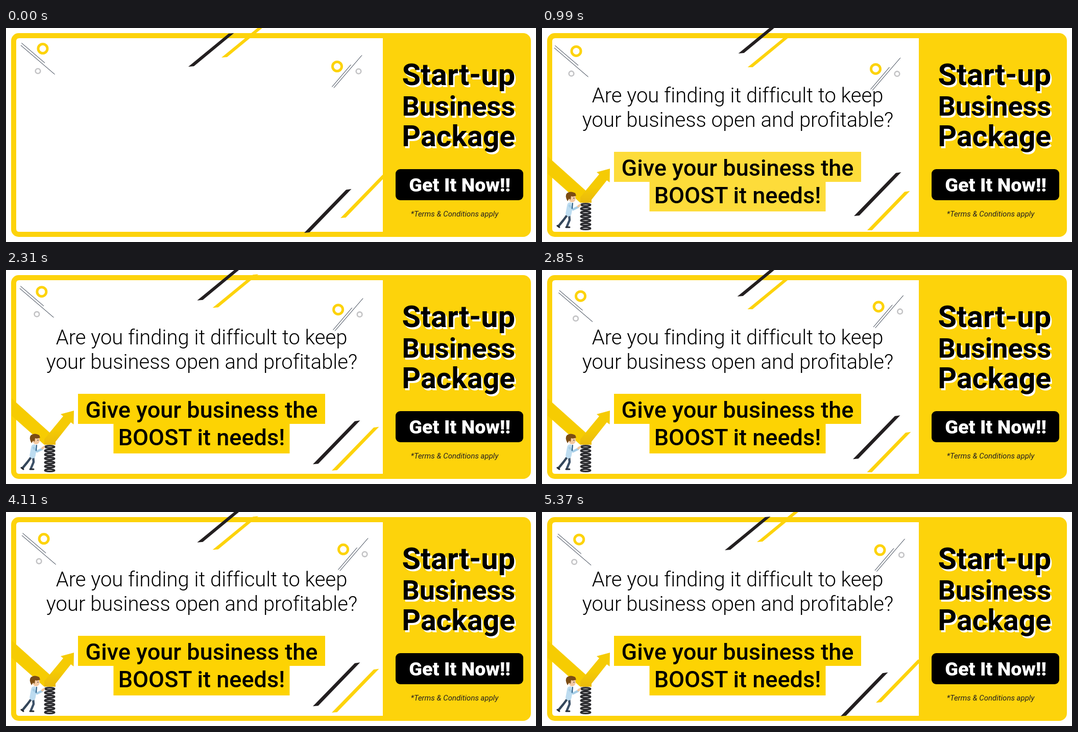
Write an HTML page that moves like this. It is 1038 px wide and 420 px high and loops after 5.4 s.

```html
<!DOCTYPE html>
<html lang="en">
<head>
<meta charset="utf-8">
<title>Start-up Business Package</title>
<style>
  html, body { margin: 0; width: 100%; height: 100%; overflow: hidden; background: #fff; }
  svg { display: block; width: 100%; height: 100%; }
  text { font-family: Roboto, sans-serif; text-anchor: middle; font-variant-ligatures: none; }
  .head { font-weight: 700; }
  .lead { font-weight: 300; font-size: 40px; }
  .boost { font-weight: 500; font-size: 45px; }
  .cta { font-weight: 900; font-size: 37.8px; fill: #fff; }
  .terms { font-style: italic; font-size: 15px; fill: #231f20; }
  .ring { fill: none; stroke: #fdd30b; stroke-width: 5; }
  .dot { fill: none; stroke: #c3c3c5; stroke-width: 2.6; }
  .thin { fill: none; stroke: #1c2738; stroke-width: 1; }
</style>
</head>
<body>
<svg viewBox="0 0 1038 420">
  <defs>
    <path id="barTop" d="M0 0L79 -65L89.500 -66L11 -1Z"/>
    <path id="barLow" d="M0 0L82 -84.500L92.500 -86L10.500 -1Z"/>
    <clipPath id="cutTop"><rect x="0" y="-20" width="1038" height="97"/></clipPath>
    <clipPath id="cutLow"><rect x="0" y="200" width="738" height="197"/></clipPath>
    <linearGradient id="rise" x1="0" y1="1" x2="0" y2="0">
      <stop offset="0" stop-color="#e9b90c"/>
      <stop offset=".45" stop-color="#f5cb04"/>
    </linearGradient>
  </defs>

  <rect x="10" y="10" width="1018" height="400" rx="15" fill="#fdd30b"/>
  <path d="M738 20V400H26Q20 400 20 394V26Q20 20 26 20Z" fill="#fff"/>

  <g id="art">
    <path d="M11 252L85.500 319L97 343H75L11 286Z" fill="#f6cc02"/>
    <path d="M85.500 319L112 287L107 283L133 276L132.500 303L127 299L97 337V343H75V332Z" fill="url(#rise)"/>
    <g id="spring" fill="none" stroke="#2c2c30"></g>
    <g fill="none" stroke-linejoin="round" stroke-linecap="round">
      <path d="M51 365L42 377L33 388" stroke="#34465a" stroke-width="4.500"/>
      <path d="M53 365L54 377L49 389" stroke="#3d5168" stroke-width="4.500"/>
      <path d="M30 388L34 391M47 391L54 391" stroke="#222831" stroke-width="3"/>
      <path d="M55 348L52 364" stroke="#bddcf0" stroke-width="11.500"/>
      <path d="M54 349L61 356L71 351" stroke="#a5cde6" stroke-width="4.500"/>
      <path d="M71 350L74.500 347.500" stroke="#f0c49c" stroke-width="4"/>
      <path d="M60 344L59 354" stroke="#2b5a80" stroke-width="2"/>
    </g>
    <ellipse cx="59" cy="334" rx="7" ry="8" fill="#f3c9a2"/>
    <path d="M50 340Q44 329 49 324Q56 319 65 324L67 329Q61 332 57 330L56 337L53 335Z" fill="#7b4c14"/>
    <circle cx="62.500" cy="334" r=".9" fill="#333"/>
  </g>

  <g id="lead" class="lead">
    <text x="383" y="146">Are you finding it difficult to keep</text>
    <text x="383.500" y="194">your business open and profitable?</text>
  </g>

  <path id="boostBox" d="M141 243H625V302H555.500V360H210.500V302H141Z" fill="#fdd303"/>
  <g id="boostText" class="boost">
    <text x="383" y="290">Give your business the</text>
    <text x="383" y="344">BOOST it needs!</text>
  </g>

  <g id="left">
    <path class="thin" d="M30.500 29.500L76 68.500M29 34L95.500 91"/>
    <circle class="ring" cx="72" cy="40.500" r="9"/>
    <circle class="dot" cx="62.500" cy="84.500" r="4.800"/>
  </g>
  <g id="right">
    <path class="thin" d="M697 53.500L642 117.500M675.500 72L638.500 115.500"/>
    <circle class="ring" cx="648.500" cy="75.500" r="9"/>
    <circle class="dot" cx="690.500" cy="85" r="4.800"/>
  </g>

  <use id="topDark" href="#barTop" fill="#231f20"/>
  <g clip-path="url(#cutTop)"><use id="topGold" href="#barTop" fill="#fdd30b"/></g>
  <use id="lowDark" href="#barLow" fill="#231f20"/>
  <g clip-path="url(#cutLow)"><use id="lowGold" href="#barLow" fill="#fdd30b"/></g>

  <g id="headline" class="head"></g>
  <rect x="763" y="277" width="250" height="61" rx="9"/>
  <text class="cta" x="888.500" y="321">Get It Now!!</text>
  <text class="terms" x="878.500" y="370">*Terms &amp; Conditions apply</text>
</svg>
<script>
const LOOP = 5400, STEP = 30;
const $ = id => document.getElementById(id);
const move = (id, x, y) => $(id).setAttribute('transform', `translate(${x.toFixed(2)} ${y.toFixed(2)})`);

function add(parent, tag, attrs, text = '') {
  const el = document.createElementNS('http://www.w3.org/2000/svg', tag);
  for (const k in attrs) el.setAttribute(k, attrs[k]);
  el.textContent = text;
  $(parent).append(el);
}

// Headline with a hard white shadow
const lines = [['Start-up', 112, 59.5], ['Business', 172, 54], ['Package', 232, 57.2]];
for (const [fill, dx, dy] of [['#fff', 3, 4], ['#000', 0, 0]])
  for (const [word, y, size] of lines)
    add('headline', 'text', { x: 886.3 + dx, y: y + dy, 'font-size': size, fill }, word);

// Spring coils
for (let i = 0; i < 7; i++) {
  const y = 347 + i * 7.7;
  add('spring', 'ellipse', { cx: 85.5, cy: y, rx: 9.5, ry: 2.2, 'stroke-width': 3.2 });
  if (i < 6) add('spring', 'path', { d: `M95 ${y + 1}L76 ${y + 6.5}`, 'stroke-width': 2.4 });
}

// Triangle wave: 0 -> 1 -> 0 over one period
const tri = (t, period) => 1 - Math.abs(1 - 2 * ((t / period) % 1));

// Clockwise walk along a diamond; phase 0 is the top corner
const diamond = (t, phase) => {
  const p = t / 1200 + phase;
  return [1 - 2 * tri(p + 0.75, 1), 2 * tri(p, 1) - 1];
};

function wander(id, t, phase) {
  const r = 7.1, [x, y] = diamond(t, phase), [x0, y0] = diamond(0, phase);
  move(id, r * (x - x0), r * (y - y0));
}

const fade = (id, t, delay) =>
  $(id).setAttribute('opacity', Math.min(1, Math.max(0, (t - delay) / 500)));

function draw(t) {
  fade('lead', t, 0);
  fade('art', t, 300);
  fade('boostText', t, 490);
  fade('boostBox', t, 600);
  wander('left', t, 0);
  wander('right', t, 0.75);
  const k = tri(t, 1800);
  move('topDark', 357 + 30.7 * k, 76 - 28.8 * k);
  move('topGold', 422 - 30.7 * k, 58 + 28.8 * k);
  move('lowDark', 584 + 30 * k, 402 - 36.8 * k);
  move('lowGold', 655 - 30 * k, 373 + 36.8 * k);
}

const start = performance.now();
function tick() {
  const t = (performance.now() - start) % LOOP;
  draw(Math.floor(t / STEP) * STEP);
  requestAnimationFrame(tick);
}
draw(0);
requestAnimationFrame(tick);
</script>
</body>
</html>
```
